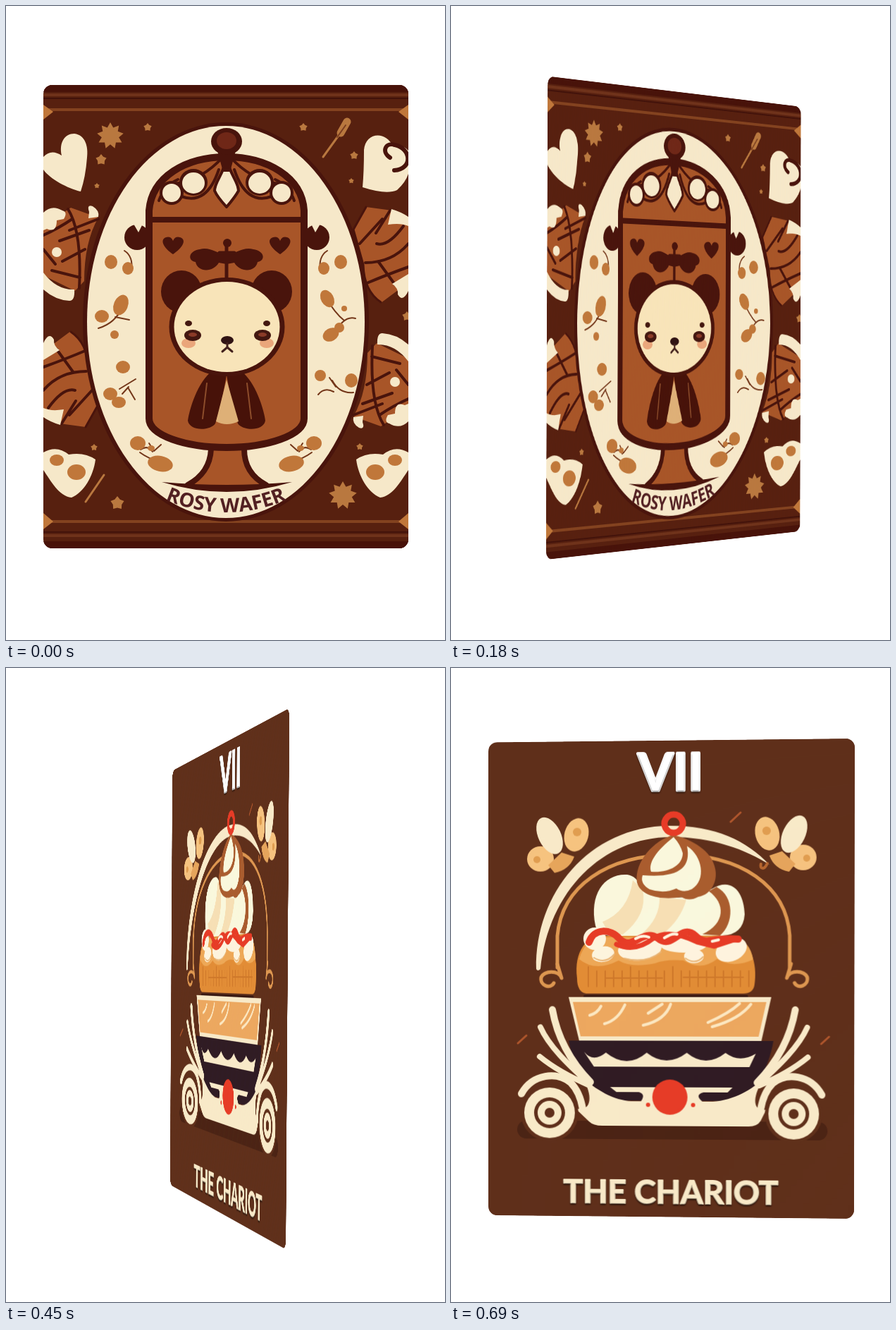
Write an HTML page with a canvas that moves like this. It is 623 px wide and 899 px high and loops after 0.75 s.

```html
<!DOCTYPE html>
<html lang="en">
<head>
<meta charset="utf-8">
<title>Card flip</title>
<style>
html, body { margin: 0; width: 100%; height: 100%; overflow: hidden; background: #fff; }
canvas { display: block; }
</style>
</head>
<body>
<canvas id="stage" width="623" height="899"></canvas>
<script>
const stage = document.getElementById('stage').getContext('2d');
let g; // context of the card being drawn

const fill = (color, d) => { g.fillStyle = color; g.fill(new Path2D(d)); };
const line = (color, width, d) => {
  g.strokeStyle = color;
  g.lineWidth = width;
  g.stroke(new Path2D(d));
};
const oval = (color, x, y, rx, ry = rx, turn = 0) => {
  g.fillStyle = color;
  g.beginPath();
  g.ellipse(x, y, rx, ry, turn, 0, 7);
  g.fill();
};
const dots = (color, ...list) => list.forEach(dot => oval(color, ...dot));
function star(color, x, y, r, points = 5) {
  g.fillStyle = color;
  g.beginPath();
  for (let i = 0; i < points * 2; i++) {
    const a = i * Math.PI / points - Math.PI / 2, q = i % 2 ? r * .65 : r;
    g.lineTo(x + q * Math.cos(a), y + q * Math.sin(a));
  }
  g.fill();
}
function twice(dx, dy, sx, sy, draw) {
  draw();
  g.save();
  g.transform(sx, 0, 0, sy, dx, dy);
  draw();
  g.restore();
}
const mirror = (axis, draw) => twice(axis * 2, 0, -1, 1, draw);
const halfTurn = draw => twice(624, 882, -1, -1, draw);

function makeCard(box, color, draw) {
  const image = document.createElement('canvas');
  image.width = 623;
  image.height = 899;
  g = image.getContext('2d');
  g.lineCap = g.lineJoin = 'round';
  g.beginPath();
  g.roundRect(...box, 13);
  g.clip();
  g.fillStyle = color;
  g.fillRect(...box);
  draw();
  return image;
}

function arcText(text, x, bottom, radius) {
  g.font = 'bold 28px "Open Sans", Lato, sans-serif';
  g.textAlign = 'center';
  const widths = [...text].map(c => g.measureText(c).width);
  const total = widths.reduce((a, b) => a + b);
  let at = -total / 2;
  [...text].forEach((c, i) => {
    g.save();
    g.translate(x, bottom - radius);
    g.rotate(-(at + widths[i] / 2) / radius);
    g.fillText(c, 0, radius);
    g.restore();
    at += widths[i];
  });
}

function drawBack() {
  const dark = '#49140c', brown = '#a85528', cream = '#f6e8c9', tan = '#c0773a', gold = '#b9783f';

  // borders
  fill('#481209', 'M53 112h518v10h-518zM53 759h518v10h-518z');
  line('#6f321a', 4, 'M53 126H571M53 751H571');
  line('#42120a', 2, 'M53 131H571M53 746H571');
  line('#83421f', 4, 'M53 147H571M53 731H571');
  mirror(312, () => fill(tan, 'M53 140L67 150L53 161ZM53 719L67 731L53 742Z'));

  // wrapped pastries
  halfTurn(() => {
    fill(brown, 'M53 312L92 286L131 300Q111 335 111 390L98 404L53 382Z');
    line(dark, 4, 'M88 288Q108 320 104 400M53 325Q75 315 94 302M76 333L118 318M80 362L112 345M65 375L105 385M53 345L70 366M90 318L131 302');
    fill(cream, 'M53 293Q65 281 80 290Q88 292 82 302L72 304Q72 322 58 316L53 318ZM118 292Q114 281 123 284Q133 290 131 299L117 301Z');
    fill(cream, 'M53 378Q72 403 97 402Q98 418 90 418Q70 417 53 402Z');
    oval(cream, 72, 349, 7);

    fill(brown, 'M53 490L92 461Q116 478 117 515L131 565L113 597L76 592L53 575Z');
    line(dark, 4, 'M53 512Q86 500 112 489M53 545Q76 518 114 518M60 570Q82 540 98 545M90 580L122 545M79 592L99 560M72 487L96 520');
    fill(cream, 'M53 478Q61 461 68 473Q67 482 76 488L53 502ZM53 570Q64 575 82 572L77 594Q63 590 53 583Z');
    line(dark, 3, 'M92 462Q116 478 117 515L131 565L113 597');
  });

  // hearts and dotted petals in the corners
  fill(cream, 'M53 214Q64 202 79 212C75 194 83 181 97 181C113 183 117 200 115 215Q113 242 106 263C88 259 62 245 53 232Z');
  fill(cream, 'M571 205Q563 196 550 200C538 175 510 180 508 204Q508 235 506 257Q540 268 555 261Q567 250 571 238Z');
  line(dark, 6, 'M545 215C532 206 539 193 552 197C575 202 578 231 551 233');
  mirror(312, () => {
    fill(cream, 'M53 633Q72 622 89 636Q111 632 127 643C124 667 110 690 93 697C75 695 64 674 53 658Z');
    oval(tan, 72, 644, 10, 8);
    oval(tan, 100, 661, 13, 11);
  });

  // crumbs
  star(gold, 148, 184, 19, 9);
  star(gold, 478, 694, 20, 9);
  [[201, 172, 6], [135, 218, 8], [422, 172, 6], [494, 212, 6], [158, 705, 10],
   [125, 626, 5], [502, 625, 5], [129, 255, 4], [490, 248, 4], [569, 440, 7]].forEach(s => star(gold, ...s));
  line(gold, 3, 'M450 214L476 178M113 703L139 665');
  line(gold, 11, 'M475 180L484 164');
  line('#7b3e20', 2, 'M470 186L482 169');

  // medallion
  oval(dark, 312, 448, 203, 283);
  oval(cream, 312, 448, 197, 278);

  // sprigs
  mirror(312, () => {
    line('#733619', 2, 'M168 347Q181 355 178 376M208 632Q201 622 191 629M203 620L210 631L220 622M190 633Q202 642 220 647');
    dots(tan, [149, 363, 9, 10], [173, 372, 8, 9], [187, 620, 11, 10], [219, 649, 18, 11, .2], [206, 627, 5, 4]);
  });
  line('#733619', 2, 'M131 457Q155 450 166 426M155 441L175 445M161 543L184 529M173 541L183 558M165 550L174 540');
  dots(tan, [136, 440, 10, 9], [163, 424, 10, 15, .4], [154, 466, 6], [166, 512, 10, 9], [148, 550, 10, 9], [160, 562, 10, 8]);
  line('#733619', 2, 'M453 412Q467 436 480 446M496 443Q479 438 465 467M443 551Q452 540 465 547M463 531Q473 550 493 548M459 527L468 540');
  dots(tan, [456, 415, 9, 13, -.5], [461, 466, 12, 9, -.5], [473, 456, 7], [480, 429, 4], [446, 524, 8], [490, 531, 9, 10]);

  // foot
  fill(brown, 'M291 624H341C341 655 355 670 373 681H252C277 670 291 655 291 624Z');
  line(dark, 8, 'M291 628C290 652 277 669 258 679M338 628C338 652 350 669 369 679');
  fill(dark, 'M221 675Q313 683 406 675Q313 703 221 675Z');

  // jar
  mirror(313.5, () => {
    oval(dark, 186, 328, 18);
    fill(cream, 'M181 309L188 321L194 309Z');
  });
  fill(brown, 'M203 303V290C207 242 255 214 313 214C370 214 420 242 423 290V585C423 609 370 626 313 626C255 626 203 609 203 585Z');
  mirror(313, () => {
    line(dark, 4, 'M240 252Q278 247 308 214M249 270Q285 283 302 232M217 276Q224 255 244 246');
    dots(dark, [235, 265, 17], [266, 250, 20, 19]);
    dots(cream, [235, 265, 13], [266, 251, 16, 15]);
  });
  fill(cream, 'M313 216C318 240 328 249 328 262Q325 271 313 284Q300 271 298 262C298 249 308 240 313 216Z');
  line(dark, 4, 'M313 216C318 240 330 249 330 262Q325 271 313 285Q300 271 296 262C296 249 308 240 313 216Z');
  line(dark, 10, 'M203 303V290C207 242 255 214 313 214C370 214 420 242 423 290V585C423 609 370 626 313 626C255 626 203 609 203 585Z');
  line(dark, 8, 'M203 303H423');
  fill(dark, 'M300 205L326 205L318 235H308Z');
  oval(dark, 313, 192, 22, 19);
  oval('#6f2717', 313, 191, 14, 12);

  // hearts and bow
  mirror(313, () => {
    fill(dark, 'M237 352C225 344 217 332 227 328Q234 326 237 333Q240 326 247 328C258 332 249 344 237 352Z');
    fill(dark, 'M313 352C300 352 290 341 275 345C259 347 257 361 269 363C272 378 294 378 302 364L313 366Z');
  });
  line(dark, 5, 'M313 338V388M303 350H324');
  oval(dark, 314, 336, 6);

  // bear
  mirror(313, () => {
    oval(dark, 249, 405, 29, 30);
    fill('#471209', 'M292 518C272 533 260 572 258 588C261 604 291 602 297 592Q306 565 313 523Z');
  });
  fill('#deb077', 'M313 530L330 589Q313 597 298 589Z');
  line('#8d4d2b', 2, 'M285 535L279 585M342 535L348 585');
  oval(dark, 313.5, 455, 82, 70);
  oval('#f8e4b9', 313.5, 455, 75, 64);
  mirror(314.5, () => {
    dots('#eaa67b', [259, 478, 10, 7]);
    dots('#431710', [265, 467, 12, 8], [259, 450, 5, 4]);
    oval('#8b3b28', 265, 466, 6, 3);
  });
  oval('#301313', 314, 474, 9, 6);
  line('#42201c', 3, 'M314 478V484L307 490M314 484L321 490');

  g.fillStyle = '#522022';
  arcText('ROSY WAFER', 312, 718, 215);
}

function drawFront() {
  const ground = '#5f2f1a', cream = '#f8e9c8', amber = '#dd9650', red = '#e63b26', ink = '#301b23', cocoa = '#a95c2e';

  g.fillStyle = '#4b2314';
  g.beginPath();
  g.roundRect(94, 643, 441, 26, 13);
  g.fill();

  // butterflies
  mirror(313.5, () => {
    dots('#f5c27f', [178, 236, 17, 24, .25], [127, 270, 19, 18]);
    oval(cream, 140, 237, 16, 28, -.45);
    fill('#e5a45b', 'M138 279L157 261L175 267Q168 286 147 290Z');
    dots('#e09d50', [179, 232, 6], [122, 271, 5]);
  });
  line('#ad542b', 3, 'M397 219L411 206M95 533L107 522M526 533L537 523');

  // arches
  fill(cream, 'M121 427C119 320 195 224 310 224C375 224 420 246 452 280C420 259 370 240 312 240C215 240 139 315 127 427Q123 431 121 427Z');
  line('#b5652e', 4, 'M449 278C445 288 438 286 440 279');
  line(amber, 5, 'M151 425V380C157 310 220 265 316 265C412 265 476 310 481 380V425');
  mirror(317, () => line(amber, 5, 'M151 420L157 440C153 428 132 429 128 439C126 451 141 456 146 447'));

  // ice cream
  fill('#f9f7dc', 'M205 365C196 320 218 291 250 293Q264 295 270 312C300 330 340 330 370 314C400 296 416 320 417 350Q415 379 385 380H230Q208 380 205 365Z');
  fill('#f6dfb4', 'M215 360Q252 345 258 301L272 314Q280 350 244 378H225ZM296 326L334 329Q326 358 300 378H270Q297 355 296 326Z');
  fill(cocoa, 'M366 317L377 311C403 325 402 363 382 380L357 378C390 363 390 334 366 317Z');
  fill(cocoa, 'M316 237C288 244 260 275 264 304C269 324 300 330 327 325Q338 332 351 325C370 322 379 302 375 285C370 259 342 244 316 237Z');
  fill('#f9f7dc', 'M316 240C291 260 280 276 284 289C308 291 329 281 329 263Q326 251 316 240ZM335 253C342 286 320 298 272 294Q268 306 282 314Q302 321 320 313Q330 320 342 314C363 301 357 267 335 253Z');
  line(red, 9, 'M316 208a13 13 0 1 0 .1 0Z');

  // cake
  fill('#e18c35', 'M179 440C174 400 195 378 217 380H400C425 385 436 420 431 450Q429 462 415 462H192Q179 460 179 440Z');
  fill('#eda756', 'M182 413Q191 382 218 382H400Q425 387 429 414Q400 427 378 413Q355 431 330 415Q305 413 290 419Q256 426 238 415Q205 432 182 413Z');
  let flutes = 'M220 440H300M330 439H415';
  for (let x = 195; x < 424; x += 12) flutes += `M${x} ${x % 5 ? 430 : 424}V452`;
  line('#ce7729', 2, flutes);
  dots('#fdf3dd', [204, 384, 16, 16], [268, 399, 31, 16, -.1], [330, 392, 34, 12], [398, 400, 23, 16, -.4], [216, 406, 16, 11, -.2], [345, 409, 14, 10]);
  line('#e8b577', 2, 'M203 411Q219 421 232 406M246 412Q277 420 298 403M333 412Q347 422 358 410');
  line(red, 10, 'M196 389C203 368 227 370 239 384C258 403 271 369 293 383C316 402 325 361 347 380C363 396 373 381 408 385');
  line(red, 7, 'M235 392Q262 404 288 383Q311 370 350 389L374 395L405 385');
  line('#fff4df', 4, 'M262 384Q272 378 281 382M303 383Q314 376 321 378M371 388L380 386');

  // bowl
  line('#371811', 4, 'M190 466H420');
  fill(cream, 'M167 467H455L441 529H182Z');
  fill('#eca75f', 'M173 474H448L437 523H184Z');
  line('#fbe7c1', 4, 'M218 505Q237 500 247 478M273 507Q304 500 312 477M280 490L300 477M365 503Q395 490 410 476M371 509Q410 498 426 477M197 493Q208 490 213 480');
  fill(ink, 'M167 529H458C452 566 433 598 411 614H215C188 593 174 563 167 529Z');
  fill(cream, 'M189 545Q202 561 220 546Q250 570 278 546Q306 568 335 546Q362 568 390 546Q410 561 433 547L424 566H203Z');

  // chassis
  fill(cream, 'M226 595H400L393 602H235Z');
  fill(cream, 'M176 625C201 633 203 605 184 578C205 600 233 614 256 615H270Q279 602 260 601H363Q344 604 357 615H372C402 613 428 598 446 580C427 607 428 630 448 626L440 642Q435 650 423 650H215Q202 650 196 644Z');
  mirror(316.5, () => {
    line(cream, 10, 'M144 485C151 525 169 558 198 588');
    line(cream, 8, 'M127 510C139 537 166 563 197 591M126 552Q153 574 195 592');
  });
  mirror(313.5, () => {
    line(cream, 10, 'M100 605C116 576 151 573 170 589Q183 602 187 626');
    dots(ground, [140, 632, 41]);
    dots(cream, [140, 632, 36]);
    dots(ground, [140, 632, 22]);
    dots(cream, [140, 632, 17]);
    dots(ground, [140, 632, 7]);
  });
  dots(red, [311, 609, 25], [280, 620, 3], [344, 620, 3]);

  // lettering
  g.textAlign = 'center';
  g.shadowColor = '#0006';
  g.shadowOffsetY = 2;
  g.shadowBlur = 2;
  const label = (text, color, size, x, y, weight) => {
    g.font = `bold ${size}px Lato, "Open Sans", sans-serif`;
    g.fillStyle = g.strokeStyle = color;
    g.lineWidth = weight;
    g.strokeText(text, x, y);
    g.fillText(text, x, y);
  };
  label('VII', '#fff', 72, 311.5, 174, 4);
  label('THE CHARIOT', cream, 46, 312.5, 760, 2);
}

// Each corner (top left, top right, bottom left, bottom right) is x, y, then its travel per unit of turn.
const backBox = [53, 112, 518, 657], frontBox = [53, 103, 520, 676];
const back = {
  box: backBox, image: makeCard(backBox, '#57200f', drawBack),
  corners: [[53, 112, 276, -41], [571, 112, -244, 101], [53, 769, 268, 52], [571, 769, -248, -80]]
};
const front = {
  box: frontBox, image: makeCard(frontBox, '#5f2f1a', drawFront),
  corners: [[53, 105.5, 268, 59], [573, 100, -250, -63], [53, 776, 263, -63], [572, 781, -256, 64]]
};
const turns = [0, .035, .137, .305, .477, .64, .803, .925, .683, .46, .26, .1, 0];

// Bilinear skew: the card is laid down in one-pixel columns.
function showCard({ box: [left, top, width, height], image, corners }, turn) {
  const [tl, tr, bl, br] = corners.map(([x, y, dx, dy]) => [x + dx * turn, y + dy * turn]);
  const mix = (p, q, u) => [p[0] + (q[0] - p[0]) * u, p[1] + (q[1] - p[1]) * u];
  const a = (tr[0] - tl[0]) / width, b = (tr[1] - tl[1]) / width, span = 1 + 1 / a;
  stage.resetTransform();
  stage.fillStyle = '#fff';
  stage.fillRect(0, 0, 623, 899);
  for (let i = 0; i < width; i++) {
    const [x, y] = mix(tl, tr, i / width), [x2, y2] = mix(bl, br, i / width);
    const w = Math.min(span, width - i);
    stage.setTransform(a, b, (x2 - x) / height, (y2 - y) / height, x, y);
    stage.drawImage(image, left + i, top, w, height, 0, 0, w, height);
  }
}

let shown = -1;
function play() {
  const t = performance.now() % 750;
  const step = t < 270 ? Math.floor(t / 60) : 5 + Math.floor((t - 270) / 60);
  if (step !== shown) showCard(step < 7 ? back : front, turns[shown = step]);
  requestAnimationFrame(play);
}
play();
</script>
</body>
</html>
```
